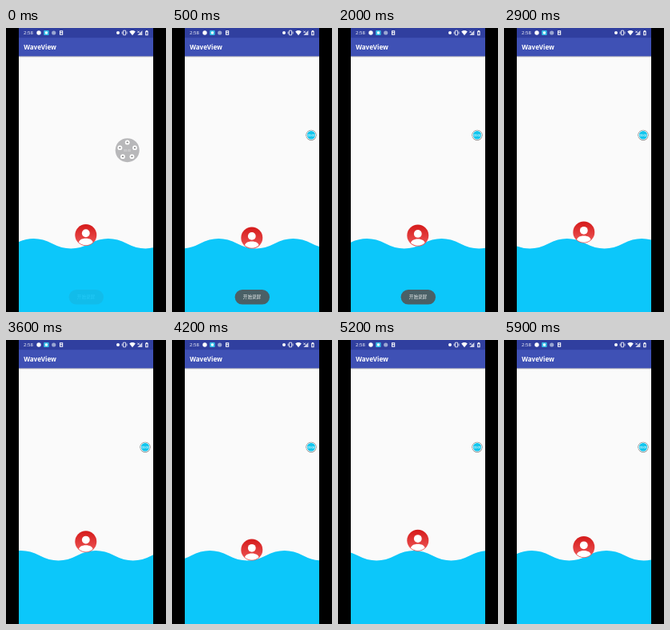
Animation, 200 px wide and 356 px high, one loop 6000 ms. Source, as an HTML page:

```html
<!DOCTYPE html>
<html lang="en">
<head>
<meta charset="utf-8">
<title>WaveView</title>
<style>
  html, body { margin: 0; width: 100%; height: 100%; overflow: hidden; background: #000; }
  svg { display: block; width: 200px; height: 356px; }
  text { font-family: "Open Sans", "Noto Sans", sans-serif; fill: #fff; }
  .mid { text-anchor: middle; }
  .toast { font-family: "Noto Sans CJK SC", "Noto Sans CJK", sans-serif; }
</style>
</head>
<body>
<svg viewBox="0 0 200 356">
  <defs>
    <clipPath id="screen"><rect x="16" width="168" height="356"/></clipPath>
    <clipPath id="face"><circle r="12.7"/></clipPath>
    <linearGradient id="red" x2="0" y2="1">
      <stop offset="0" stop-color="#d51a1a"/>
      <stop offset="1" stop-color="#ee5858"/>
    </linearGradient>
    <linearGradient id="shade" x2="0" y2="1">
      <stop offset="0" stop-color="#000" stop-opacity=".3"/>
      <stop offset="1" stop-color="#000" stop-opacity="0"/>
    </linearGradient>
  </defs>
  <rect width="200" height="356"/>
  <g clip-path="url(#screen)">
    <rect x="16" width="168" height="356" fill="#fafafa"/>
    <path id="wave" fill="#0cc7fa"/>

    <g id="avatar">
      <circle r="13.5" fill="url(#red)"/>
      <g clip-path="url(#face)" fill="#fff">
        <circle cy="-2.2" r="4.9"/>
        <path d="M-9 14V10.5C-9 6.5-5 4.4 0 4.4S9 6.5 9 10.5V14Z"/>
      </g>
    </g>

    <rect x="16" y="35" width="168" height="2.2" fill="url(#shade)"/>
    <rect x="16" y="12" width="168" height="23.4" fill="#3f51b5"/>
    <rect x="16" width="168" height="12.2" fill="#303f9f"/>
    <text x="22.2" y="26.7" font-size="8" font-weight="700">WaveView</text>

    <text x="22" y="8.4" font-size="6">2:58</text>
    <g fill="#fff">
      <circle cx="41" cy="6" r="2.7"/>
      <rect x="47.2" y="2.9" width="6.4" height="6.2" rx=".8" fill="#35bfe8"/>
      <circle cx="50.4" cy="6" r="1.7"/>
      <circle cx="59.7" cy="6" r="2.6" fill="#9aa6d2"/>
      <path d="M67 3.2h4.2v5.6H67zM68 4.2v1h2.2v-1zM68 6.3v1.4h2.2V6.3z" fill-rule="evenodd"/>
      <circle cx="140" cy="6" r="2"/>
      <path d="M154.2 4.4Q158 1.7 161.8 4.4L158 9.2Z"/>
      <path d="M170.4 3V9H164.4Z" opacity=".75"/>
      <path d="M174.2 3.7h.9V3h1.6v.7h.9v5.5h-3.4zM175.2 5v3.2h1.4V5z" fill-rule="evenodd"/>
    </g>
    <g fill="none" stroke="#fff" stroke-width=".8">
      <path d="M146.6 3.2h3v5.6h-3zM145.2 4.5v3M151 4.5v3"/>
      <path d="M164.4 3.6l2.4 2.4m0-2.4L164.4 6"/>
    </g>

    <g id="ball">
      <circle r="6.6" fill="#777"/>
      <circle r="6" fill="#fff"/>
      <circle r="5.2" fill="#12c6ee"/>
      <text id="timer" class="mid" y="1.3" font-size="3.6" font-weight="600">00:00</text>
    </g>
    <g id="menu">
      <circle r="15" fill="#b8b8ba"/>
      <text class="mid" y="1.8" font-size="3.4" opacity=".7">00:00</text>
    </g>

    <g id="toast">
      <rect x="78.6" y="328" width="43.4" height="18.6" rx="9.3" fill="#4a6066"/>
      <text class="mid toast" x="100" y="339.3" font-size="5.6" style="fill:#e8ecec">开始录屏</text>
    </g>
  </g>
</svg>
<script>
  const LOOP = 6000, STEP = 100, PERIOD = 1965;
  const LENGTH = 93.3, HALF = LENGTH / 2, LEVEL = 270.2, AMP = 6.2, CREST = 34.5;
  const el = id => document.getElementById(id);
  const clamp = v => Math.max(0, Math.min(1, v));
  const mix = (a, b, k) => a + (b - a) * k;

  // Five buttons around the menu centre
  const NS = "http://www.w3.org/2000/svg";
  function add(parent, name, attrs) {
    const node = document.createElementNS(NS, name);
    for (const key in attrs) node.setAttribute(key, attrs[key]);
    parent.append(node);
  }
  for (let i = 0; i < 5; i++) {
    const a = (i * 72 - 90) * Math.PI / 180;
    const cx = 9.8 * Math.cos(a), cy = 9.8 * Math.sin(a);
    add(el("menu"), "circle", { cx, cy, r: 2.9, fill: "#fff" });
    add(el("menu"), "rect", { x: cx - 1.1, y: cy - .9, width: 2.2, height: 1.8, rx: .6, fill: "#888" });
  }

  // Height of the parabolic wave at x
  function surface(x, crest) {
    const turn = (x - crest) / LENGTH + .25;
    const u = (turn - Math.floor(turn)) * 2;
    const v = u % 1;
    return LEVEL - (u < 1 ? 1 : -1) * 4 * AMP * v * (1 - v);
  }

  function wavePath(crest) {
    let d = `M${crest % LENGTH - LENGTH - HALF / 2} ${LEVEL}`;
    for (let i = 0; i < 4; i++)
      d += `q${HALF / 2} ${-2 * AMP} ${HALF} 0q${HALF / 2} ${2 * AMP} ${HALF} 0`;
    return d + "V356H0Z";
  }

  function draw(t) {
    const crest = CREST + t / PERIOD * LENGTH;
    el("wave").setAttribute("d", wavePath(crest));
    el("avatar").setAttribute("transform", `translate(99.8 ${surface(99.8, crest) - 13})`);

    const close = clamp(t / 300);
    const x = mix(151.7, 174, close), y = mix(153.2, 134.3, close);
    el("menu").setAttribute("transform", `translate(${x} ${y}) scale(${mix(1, .43, close)})`);
    el("menu").setAttribute("opacity", close < 1 ? 1 : 0);
    el("ball").setAttribute("transform", "translate(174 134.3)");
    el("ball").setAttribute("opacity", close < 1 ? 0 : 1);
    el("timer").textContent = "00:0" + Math.floor(t / 1000);

    const shown = Math.min(clamp(.1 + t / 450), clamp((2800 - t) / 500));
    el("toast").setAttribute("opacity", shown);
  }

  function tick() {
    const t = performance.now() % LOOP;
    draw(Math.floor(t / STEP) * STEP);
    requestAnimationFrame(tick);
  }
  tick();
</script>
</body>
</html>
```
